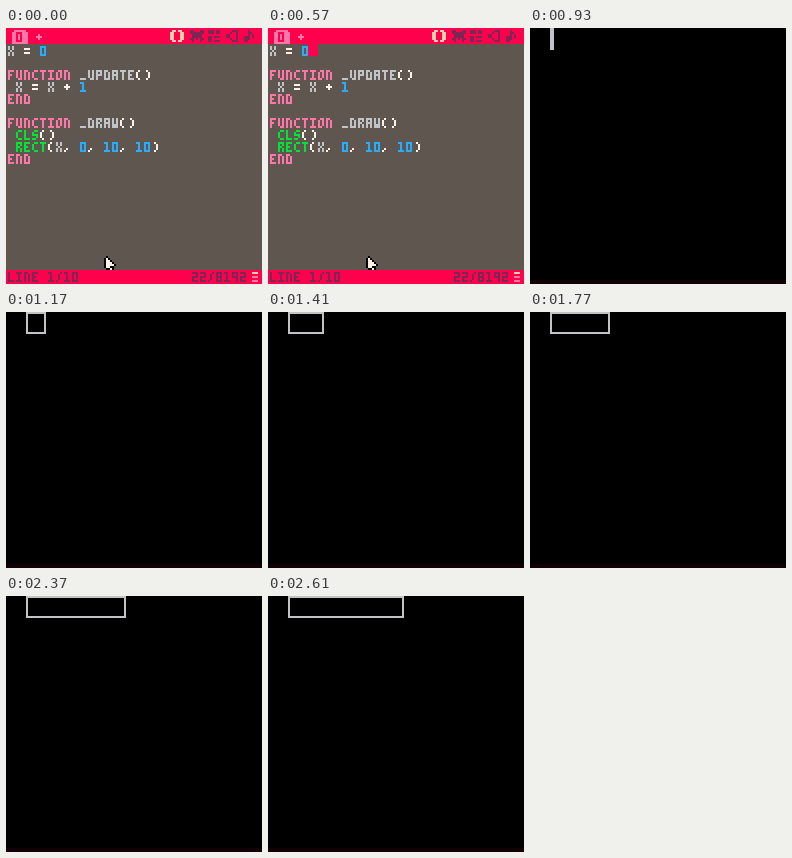
These frames come from a looping animation (256 px wide and 256 px high, 2640 ms). An HTML page with a canvas:

```html
<!DOCTYPE html>
<html lang="en">
<head>
<meta charset="utf-8">
<title>Moving rectangle</title>
<style>
html, body { margin: 0; height: 100%; overflow: hidden; background: #000; }
canvas { display: block; width: 256px; height: 256px; image-rendering: pixelated; }
</style>
</head>
<body>
<canvas id="screen" width="256" height="256"></canvas>
<script>
const ctx = document.getElementById('screen').getContext('2d');
ctx.scale(2, 2);

const LOOP = 2640, STEP = 30, RUN_START = 600;
const RED = '#ff004d', PINK = '#ff77a8', PLUM = '#7e2553', BROWN = '#5f574f',
  GREY = '#c2c3c7', WHITE = '#fff1e8', BLUE = '#29adff', GREEN = '#00e436',
  PEACH = '#ffccaa', BLACK = '#000';

// Each stroke joins two points of a 3 by 5 grid lettered a to o, row by row.
const STROKES = {
  A: 'ac am co gi', C: 'bc dj no', D: 'am ab fo mo', E: 'am ac gh mo',
  F: 'am ac gh', I: 'ac bn mo', L: 'am mo', N: 'am ab fo', O: 'bc dm cl mn',
  P: 'am ac ci gi', R: 'am ac cf gh lo', S: 'bc dg gi il mn', T: 'ac bn',
  U: 'aj co no', W: 'am co kn', X: 'ad cf hh jm lo',
  0: 'ac mo am co', 1: 'ab bn mo', 2: 'ac ci gi gm mo', 8: 'am co ac gi mo',
  9: 'ac ag co gi', '(': 'bb dj nn', ')': 'bb fl nn', '+': 'gi ek',
  '=': 'df jl', ',': 'kk mm', '/': 'cc ek mm', '_': 'mo', '>': 'aa ee ii kk mm'
};

const CODE = [
  'X = 0', '', 'FUNCTION _UPDATE()', ' X = X + 1', 'END', '',
  'FUNCTION _DRAW()', ' CLS()', ' RECT(X, 0, 10, 10)', 'END'
];

function box(x, y, w, h, color) {
  ctx.fillStyle = color;
  ctx.fillRect(x, y, w, h);
}

function write(text, x, y, color) {
  [...text].forEach((char, i) => {
    for (const stroke of (STROKES[char] || '').split(' ').filter(Boolean)) {
      const [from, to] = [...stroke].map(p => p.charCodeAt(0) - 97);
      const left = Math.min(from % 3, to % 3), top = Math.floor(from / 3);
      box(x + i * 4 + left, y + top, Math.abs(to % 3 - from % 3) + 1,
        Math.floor(to / 3) - top + 1, color);
    }
  });
}

function tokenColor(token) {
  if (/^(FUNCTION|END)$/.test(token)) return PINK;
  if (/^(CLS|RECT)$/.test(token)) return GREEN;
  if (/^\d/.test(token)) return BLUE;
  return /^[A-Z_]/.test(token) ? GREY : WHITE;
}

function drawCode() {
  CODE.forEach((line, row) => {
    for (const match of line.matchAll(/[A-Z_]+|\d+|\S/g))
      write(match[0], 1 + match.index * 4, 9 + row * 6, tokenColor(match[0]));
  });
}

function drawIcons() {
  const plum = (x, y, w, h) => box(x, y, w, h, PLUM);
  // brackets
  for (const [end, side] of [[83, 82], [86, 87]]) {
    box(end, 1, 2, 1, PEACH);
    box(side, 2, 2, 4, PEACH);
    box(end, 6, 2, 1, PEACH);
  }
  // creature
  plum(92, 1, 2, 2); plum(97, 1, 2, 2);
  plum(93, 3, 5, 2); plum(94, 2, 3, 1);
  plum(92, 5, 2, 1); plum(95, 5, 1, 1); plum(97, 5, 2, 1);
  plum(93, 6, 1, 1); plum(97, 6, 1, 1);
  // tiles
  plum(101, 1, 3, 2); plum(105, 1, 2, 2);
  plum(101, 4, 2, 3); plum(104, 4, 3, 1); plum(104, 6, 3, 1);
  // speaker
  plum(110, 3, 2, 2); plum(112, 2, 1, 1); plum(112, 5, 1, 1);
  plum(113, 1, 2, 1); plum(113, 6, 2, 1); plum(115, 1, 1, 6);
  // note
  plum(121, 1, 1, 5); plum(122, 2, 1, 1); plum(123, 3, 1, 2);
  plum(119, 4, 2, 3); plum(121, 5, 1, 1);
}

function drawPointer(x, y) {
  box(x + 1, y, 1, 1, BLACK);
  for (let i = 1; i < 5; i++) {
    box(x, y + i, i + 2, 1, BLACK);
    box(x + 1, y + i, i, 1, WHITE);
  }
  box(x, y + 5, 5, 1, BLACK);
  box(x + 1, y + 5, 2, 1, WHITE);
  box(x + 1, y + 6, 4, 1, BLACK);
  box(x + 3, y + 6, 1, 1, WHITE);
}

function drawEditor(caretOn) {
  box(0, 0, 128, 128, BROWN);
  box(0, 0, 128, 8, RED);
  box(0, 121, 128, 7, RED);
  box(4, 1, 6, 1, PINK);
  box(3, 2, 8, 6, PINK);
  write('0', 5, 2, RED);
  write('+', 15, 2, PINK);
  drawIcons();
  drawCode();
  if (caretOn) box(20, 8, 5, 6, RED);
  write('LINE 1/10', 1, 122, PLUM);
  write('22/8192', 93, 122, PLUM);
  box(123, 122, 3, 1, PEACH);
  box(123, 124, 3, 1, PINK);
  box(123, 126, 3, 1, PINK);
  drawPointer(49, 114);
}

function drawRun(x) {
  box(0, 0, 128, 128, BLACK);
  box(0, 126, 128, 2, '#120006');
  const left = Math.min(x, 10), width = Math.abs(x - 10) + 1;
  box(left, 0, width, 11, GREY);
  if (width > 2) box(left + 1, 1, width - 2, 9, BLACK);
}

function drawPrompt() {
  drawRun(31);
  box(10, 0, 3, 6, BLACK);
  write('>', 0, 0, WHITE);
}

function frame() {
  const t = performance.now() % LOOP;
  const x = Math.floor((t - RUN_START) / STEP);
  if (x < 0) drawEditor((t >= 120 && t < 360) || t >= 570);
  else if (x === 0) drawPrompt();
  else drawRun(x);
  requestAnimationFrame(frame);
}
frame();
</script>
</body>
</html>
```
